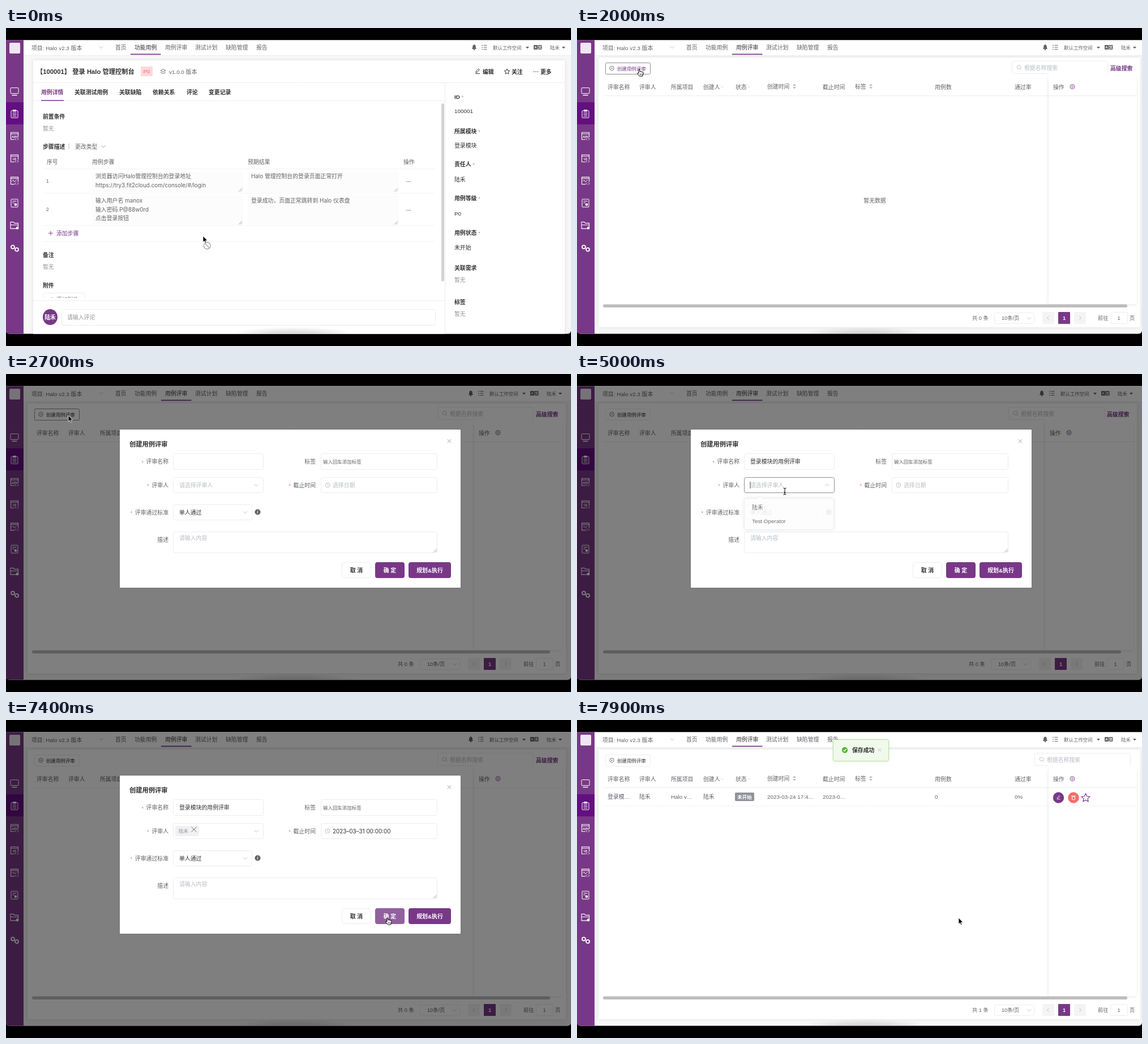
An HTML page with a canvas that plays this animation: 998x561 px, repeating every 8000 ms.

```html
<!DOCTYPE html>
<html lang="zh-CN">
<head>
<meta charset="utf-8">
<title>用例评审</title>
<style>
html, body { margin: 0; width: 100%; height: 100%; overflow: hidden; background: #000; }
canvas { display: block; }
</style>
</head>
<body>
<canvas id="stage" width="998" height="561"></canvas>
<script>
const c = document.getElementById('stage').getContext('2d');
const LOOP = 8000, STEP = 100, SIZE = 9.87, SMALL = 8.46, LARGE = 11.28, BOLD = 600;
const MAIN = '#783887', DARK = '#303133', GRAY = '#606266', MID = '#909399', PALE = '#b8bbc2',
  LINE = '#ebedf1', FOCUS = '#8f8c93', RED = '#f56c6c', WHITE = '#fff';
const SANS = '"Liberation Sans","Noto Sans CJK SC",sans-serif';
const INPUT = 'Inter,"Noto Sans CJK SC",sans-serif';
const USER = '陆禾', REVIEW = '登录模块的用例评审';

// Drawing helpers; text is centred vertically on y
function text(s, x, y, color = GRAY, size = SIZE, weight = 400, align = 'left', family = SANS) {
  c.font = `${weight} ${size}px ${family}`;
  c.textAlign = align;
  c.fillStyle = color;
  c.fillText(s, x, y + size * .37);
}
const texts = (list, ...style) => list.forEach(item => text(...item, ...style));
const value = (s, x, y, color = GRAY) => text(s, x, y, color, SIZE, 400, 'left', INPUT);
const centred = (s, x, y, color, size, weight) => text(s, x, y, color, size, weight, 'center');

function paint(fill, stroke, width = 1) {
  if (fill) { c.fillStyle = fill; c.fill(); }
  if (stroke) { c.strokeStyle = stroke; c.lineWidth = width; c.stroke(); }
}
function box(x, y, w, h, r, fill, stroke) {
  c.beginPath();
  c.roundRect(x, y, w, h, r);
  paint(fill, stroke);
}
function disc(x, y, r, fill, stroke, width) {
  c.beginPath();
  c.arc(x, y, r, 0, 7);
  paint(fill, stroke, width);
}
function trace(pts, close) {
  c.beginPath();
  for (let i = 0; i < pts.length; i += 2) c.lineTo(pts[i], pts[i + 1]);
  if (close) c.closePath();
}
function line(color, width, ...pts) { trace(pts); paint(null, color, width); }
function shape(fill, stroke, width, ...pts) { trace(pts, true); paint(fill, stroke, width); }
function card(x, y, w, h, r, blur, color = 'rgba(0,0,0,.1)') {
  c.save();
  c.shadowColor = color;
  c.shadowBlur = blur;
  box(x, y, w, h, r, WHITE);
  c.restore();
}
function at(x, y, draw) { c.save(); c.translate(x, y); draw(); c.restore(); }
function faded(alpha, draw) {
  if (alpha <= 0) return;
  c.save();
  c.globalAlpha *= alpha;
  draw();
  c.restore();
}
const field = (x, y, w, h, focus) => box(x + .5, y + .5, w - 1, h - 1, 3, WHITE, focus ? FOCUS : LINE);
const chevron = (x, y, dir = 1, color = PALE) => line(color, .9, x - 3.5, y - 1.7 * dir, x, y + 1.8 * dir, x + 3.5, y - 1.7 * dir);
const sideways = (x, y, dir, color) => line(color, 1, x - 1.5 * dir, y - 3, x + 1.5 * dir, y, x - 1.5 * dir, y + 3);
const triangle = (x, y) => shape(GRAY, null, 0, x - 3, y - 1.5, x + 3, y - 1.5, x, y + 2);
function cross(x, y, r, color) { line(color, .9, x - r, y - r, x + r, y + r); line(color, .9, x - r, y + r, x + r, y - r); }
function plus(x, y, color) { line(color, .9, x - 4, y, x + 4, y); line(color, .9, x, y - 4, x, y + 4); }
function grip(x, y) { line(MID, .8, x - 3, y + 3, x + 3, y - 3); line(MID, .8, x, y + 3, x + 3, y); }
function sorter(x, y) {
  shape(PALE, null, 0, x - 3, y - 1, x + 3, y - 1, x, y - 4.5);
  shape(PALE, null, 0, x - 3, y + 1, x + 3, y + 1, x, y + 4.5);
}
function star(x, y, r, width, color) {
  const pts = [];
  for (let i = 0; i < 10; i++) {
    const a = i * Math.PI / 5, q = i % 2 ? r * .48 : r;
    pts.push(x + q * Math.sin(a), y - q * Math.cos(a));
  }
  shape(null, color, width, ...pts);
}
function pencil(x, y, color) {
  shape(null, color, 1, x - 3, y + 2.5, x - 2.6, y, x + 1.5, y - 4, x + 3.3, y - 2.2, x - .8, y + 2);
  line(color, 1, x - 4, y + 4.4, x + 4, y + 4.4);
}

// Timing helpers
const ramp = (t, from, to) => Math.min(1, Math.max(0, (t - from) / (to - from)));
const ease = p => p * p * (3 - 2 * p);
const during = (t, from, to) => t >= from && t < to;
const lastKey = (keys, t) => keys.findLastIndex(k => k[0] <= t);

// Sidebar
const code = () => { line(WHITE, .9, 3, 3, 1, 5, 3, 7); line(WHITE, .9, 5, 3, 7, 5, 5, 7); };
function panel(label) {
  line(WHITE, 1.1, 0, 6, -6.5, 6, -6.5, -6.5, 6.5, -6.5, 6.5, 2);
  line(WHITE, 1, -6.5, -4, 6.5, -4);
  if (label) centred(label, 0, .5, WHITE, 6, 700);
  code();
}
function gear(x, y) { disc(x, y, 3, null, WHITE, 1.8); }
const sideIcons = [
  () => { box(-7, -6.5, 14, 10, 1, null, WHITE); line(WHITE, 1.3, -4.5, 6.5, 4.5, 6.5); },
  () => {
    box(-6, -5.5, 12, 12.5, 1, null, WHITE);
    box(-3, -7.5, 6, 3.5, 1, WHITE);
    [-1.5, 1.2, 4].forEach(y => line(WHITE, 1, -3.5, y, 3.5, y));
  },
  () => panel('API'),
  () => panel('UI'),
  () => { panel(); line(WHITE, 1, -5, 1, -2.5, -1.5, 0, 2, 4, -2); },
  () => {
    box(-6, -7, 12, 14, 1, null, WHITE);
    line(WHITE, 1, -3.5, -3.5, 3.5, -3.5);
    line(WHITE, 1, -3.5, -.5, 0, -.5);
    disc(2, 2.5, 2.3, WHITE);
  },
  () => { shape(null, WHITE, 1.1, -7, 5.5, -7, -6, -2, -6, 0, -4, 6.5, -4, 6.5, 5.5); line(WHITE, 1, -7, -1, 6.5, -1); disc(5, 4.5, 2.4, WHITE); },
  () => { gear(-3, -1.5); gear(4, 3); }
];
function sidebar() {
  box(0, 21, 31, 520, 0, MAIN);
  box(0, 131, 31, 39, 0, '#640f81');
  box(6, 26, 19, 19, 2, '#efe6f2');
  sideIcons.forEach((icon, i) => at(15, 112 + 39.4 * i, icon));
}

function topbar(active, hover, dx) {
  box(31, 21, 967, 27, 0, WHITE);
  line(LINE, 1, 31, 48.5, 998, 48.5);
  text('项目: Halo v2.3 版本', 45, 35);
  chevron(168, 34);
  [['首页', 193], ['功能用例', 227], ['用例评审', 281], ['测试计划', 334], ['缺陷管理', 388], ['报告', 442]]
    .forEach(([s, x], i) => text(s, x, 34.5, i === active || i === hover ? DARK : GRAY));
  box(active === 1 ? 220 : 274, 45.5, 53.5, 1.7, 0, MAIN);
  at(-dx, 0, () => {
    shape(GRAY, null, 0, 823, 37, 824, 35, 824.5, 31, 827, 29, 829.5, 31, 830, 35, 831, 37);
    disc(827, 38, 1.2, GRAY);
    [30.5, 34, 37.5].forEach(y => { line(GRAY, 1, 843.5, y, 849.5, y); line(GRAY, 1, 840, y, 842, y); });
    text('默认工作空间', 860, 34.5, GRAY, SMALL);
    triangle(921, 34.5);
    box(932, 30, 7, 8, 1, GRAY);
    box(939.5, 30, 7, 8, 1, GRAY);
    centred('A', 935.5, 34, WHITE, 6, 700);
    centred('文', 943, 34, WHITE, 6, 700);
    text(USER, 961, 34.5, GRAY, SMALL);
    triangle(985, 34.5);
  });
}

function detailPage(t) {
  card(48, 57, 939, 500, 2, 6);
  text('【100001】 登录 Halo 管理控制台', 54, 77, DARK, LARGE, BOLD);
  box(238, 68, 21, 17, 1, '#fcd9d9');
  centred('P0', 248.5, 76.5, RED, SIZE);
  shape(null, GRAY, .9, 273, 75, 277.5, 72.5, 282, 75, 277.5, 77.5);
  line(GRAY, .9, 273, 78, 277.5, 80.5, 282, 78);
  text('v1.0.0 版本', 288, 77.5);
  pencil(833, 76, DARK);
  star(885, 77, 5, 1, DARK);
  texts([['编辑', 842, 77], ['关注', 893, 77], ['更多', 944, 77]], DARK, SIZE, BOLD);
  [932.5, 936, 939.5].forEach(x => disc(x, 77, .8, DARK));
  line(LINE, 1, 48, 96.5, 987, 96.5);
  line(LINE, 1, 775.5, 96, 775.5, 540);
  line(LINE, 1, 48, 128, 775, 128);

  ['用例详情', '关联测试用例', '关联缺陷', '依赖关系', '评论', '变更记录'].forEach((s, i) =>
    text(s, [62, 121, 200, 259, 319, 358][i], 113, i === 0 || i === 2 && t === 300 ? MAIN : DARK, SIZE, BOLD));
  box(62, 127, 40, 1.6, 0, MAIN);

  texts([['前置条件', 65, 156], ['步骤描述', 65, 209], ['备注', 65, 400], ['附件', 65, 454]], DARK, SIZE, BOLD);
  texts([['暂无', 65, 177], ['暂无', 65, 421]], MID);
  line(PALE, 1, 111, 204, 111, 214);
  text('更改类型', 122, 209);
  chevron(172, 209, 1, MID);
  texts([['序号', 72, 236], ['用例步骤', 152, 236], ['预期结果', 427, 236], ['操作', 702, 236]]);
  [[254, 36, '1', 269.5], [295, 53, '2', 320]].forEach(([y, h, n, mid]) => {
    [152, 427].forEach(x => {
      box(x, y, 267, h, 2, '#fcfcfc');
      grip(x + 262, y + h - 4.5);
    });
    text(n, 71, mid, GRAY, SMALL);
    [708, 711, 714].forEach(x => disc(x, mid + 1.5, .8, GRAY));
  });
  [248.5, 291.5, 348.5, 376.5].forEach(y => line('#f3f4f6', 1, 65, y, 758, y));
  value('浏览器访问Halo管理控制台的登录地址', 158, 261.5);
  value('https:\/\/try3.fit2cloud.com/console/#/login', 158, 277.5);
  value('Halo 管理控制台的登录页面正常打开', 433, 261.5);
  value('输入用户名 manox', 158, 304);
  value('输入密码 P@88w0rd', 158, 320);
  value('点击登录按钮', 158, 335.5);
  value('登录成功，页面正常跳转到 Halo 仪表盘', 433, 304);
  plus(79, 362, MAIN);
  text('添加步骤', 89, 362.5, MAIN);
  field(65, 467, 75, 24);
  plus(81, 479, GRAY);
  text('添加附件', 89, 479);
  box(49, 476, 725, 64, 0, WHITE);
  faded(1 - ramp(t, 100, 400), () => box(769, 133, 5, 314, 2.5, '#d2d2d4'));
  line(LINE, 1, 48, 481, 775, 481);
  c.beginPath();
  c.ellipse(78, 510, 13, 14, 0, 0, 7);
  paint(MAIN);
  centred(USER, 78, 510, WHITE, SIZE, BOLD);
  field(98, 496, 661, 29);
  text('请输入评论', 108, 510.5, MID);

  [['ID', '100001', 121, 146], ['所属模块', '登录模块', 182, 207], ['责任人', USER, 240, 267],
    ['用例等级', 'P0', 300, 327], ['用例状态', '未开始', 361, 387], ['关联需求', '暂无', 423, 444], ['标签', '暂无', 483, 504]
  ].forEach(([label, s, y1, y2], i) => {
    text(label, 792, y1, DARK, SIZE, BOLD);
    if (i < 5) text('*', 792 + c.measureText(label).width + 3, y1 + 1, RED, SMALL);
    text(s, 792, y2, i < 5 ? DARK : MID);
  });
}

function listPage(t, dx) {
  const saved = t >= 7700, ready = during(t, 900, 7700);
  card(38, 52, 957 - dx, 476, 2, 6);
  box(50.5, 61.5, 79, 20, 2, WHITE, during(t, 1900, 2800) ? FOCUS : LINE);
  disc(61.5, 71, 3.7, null, GRAY, .9);
  disc(61.5, 71, 1, GRAY);
  text('创建用例评审', 71, 71.5, during(t, 1900, 2600) ? MAIN : DARK, SMALL);
  texts([['评审名称', 54, 104], ['评审人', 110, 104], ['所属项目', 166, 104], ['创建人', 223, 104], ['状态', 280, 104],
    ['创建时间', 336, 103], ['截止时间', 434, 104], ['标签', 491, 103], ['用例数', 632, 104], ['通过率', 773, 104]], GRAY);
  [256.5, 303.5].forEach(x => at(x, 104, () => { c.scale(.6, .6); chevron(0, 0); }));
  sorter(384, 103);
  sorter(519, 103);
  line(LINE, 1, 46, 119.5, 989 - dx, 119.5);
  if (ready) centred('暂无数据', 526, 304);

  at(-dx, 0, () => {
    const sx = ready ? 768 : 808;
    field(sx, 58, 170, 23);
    disc(sx + 12.5, 69, 3.3, null, PALE, .9);
    line(PALE, .9, sx + 15, 71.5, sx + 17, 73.5);
    text('根据名称搜索', sx + 22, 70, PALE);
    if (ready) text('高级搜索', 942, 71, MAIN, SIZE, BOLD);
    card(833, 87, 156, 400, 0, 6, 'rgba(0,0,0,.12)');
    box(833, 80, 160, 7, 0, WHITE);
    box(990, 82, 4, 420, 0, WHITE);
    line(LINE, 1, 834, 119.5, 989, 119.5);
    text('操作', 841, 104);
    disc(875, 103.5, 4, null, MAIN, .9);
    disc(875, 103.5, 1.5, null, MAIN, .8);

    text(`共 ${saved ? 1 : 0} 条`, 698, 512, GRAY, 9.2);
    field(737, 502, 71, 20);
    text('10条/页', 750, 512, GRAY, 9.2);
    chevron(798.5, 512);
    box(822, 501, 21, 21, 1, '#f4f4f5');
    box(850, 501, 21, 21, 1, MAIN);
    box(878, 501, 21, 21, 1, '#f4f4f5');
    sideways(832, 511.5, -1, PALE);
    centred('1', 860.5, 512, WHITE, 9.2, BOLD);
    sideways(889, 511.5, 1, PALE);
    text('前往', 920, 512, GRAY, 9.2);
    field(942, 501, 31, 21);
    centred('1', 957, 512, GRAY, 9.2);
    text('页', 976, 512, GRAY, 9.2);
  });
  box(46, 487.5, dx ? 915 : 926, 5.5, 2.7, '#bdbdbd');

  if (saved) {
    texts([['登录模…', 54, 135.5], [USER, 110, 135.5], ['Halo v…', 166, 135.5], [USER, 223, 135.5], ['2023-03-24 17:4…', 336, 135.5],
      ['2023-0…', 434, 135.5], ['0', 632, 135.5], ['0%', 773, 135.5]], GRAY);
    box(279, 128, 34, 15, 2, MID);
    centred('未开始', 296, 135.5, WHITE, SMALL, BOLD);
    line('#f3f4f6', 1, 46, 151.5, 989, 151.5);
    disc(850.5, 137, 9.7, MAIN);
    at(850.5, 136.5, () => { c.scale(.75, .75); pencil(0, 0, WHITE); });
    disc(877, 137, 9.7, RED);
    box(874.5, 135.5, 5, 5, .5, null, WHITE);
    line(WHITE, 1, 873, 134, 881, 134);
    star(898.5, 137.5, 7.8, 1.2, MAIN);
  }
}

function button(s, x, w, fill) {
  box(x + .5, 332.5, w - 1, 27, 3, fill, fill === WHITE ? LINE : fill);
  centred(s, x + w / 2, 346, fill === WHITE ? DARK : WHITE, SIZE, BOLD);
}
const caret = (x, y) => line(DARK, .9, x, y - 6, x, y + 6);

function dialog(t) {
  const picked = t >= 5500, dated = t >= 6700;
  const nameFocus = during(t, 3100, 4700), userFocus = during(t, 4700, 5700), dateFocus = during(t, 6000, 7100);
  card(201, 98, 602, 279, 1, 3, 'rgba(0,0,0,.15)');
  text('创建用例评审', 218, 123.5, DARK, LARGE, BOLD);
  cross(783, 118.5, 3.2, MID);
  [['评审名称', 287, 154.5, 1], ['评审人', 287, 196, 1], ['评审通过标准', 287, 244, 1], ['描述', 287, 292],
    ['标签', 547, 154.5], ['截止时间', 547, 196, 1]].forEach(([s, x, y, must]) => {
    text(s, x, y, GRAY, SIZE, 400, 'right');
    if (must) text('*', x - s.length * SIZE - 6.5, y + 1, RED, SMALL, 400, 'center');
  });

  field(295, 140, 160, 29, nameFocus);
  if (t >= 3500) value(REVIEW, 306, 154.5, DARK);
  if (nameFocus && !during(t, 3800, 4000) && t < 4300) caret(t < 3500 ? 306 : 395, 154.5);
  field(556, 140, 206, 29);
  text('输入回车添加标签', 560, 155, GRAY, SMALL);

  field(295, 182, 160, 28, userFocus);
  if (picked) {
    box(299, 187, 42, 18, 2, '#f1f1f3');
    text(USER, 305, 196, MID, SMALL);
    cross(332, 193, 4.5, GRAY);
  } else {
    value('请选择评审人', 306, 196, PALE);
    if (userFocus && t !== 5200) caret(306, 196);
  }
  chevron(442, 196, userFocus ? -1 : 1);

  field(556, 182, 206, 28, dateFocus);
  disc(568, 196, 4, null, PALE, .9);
  line(PALE, .9, 568, 193.5, 568, 196.3, 570, 196.3);
  if (dated) value('2023–03–31 00:00:00', 577, 196, DARK);
  else value('选择日期', 577, 196, PALE);

  field(295, 230, 140, 28);
  value('单人通过', 306, 244.5, DARK);
  chevron(422.5, 244);
  disc(444.5, 243.5, 5, GRAY);
  c.font = `italic 700 8px "Liberation Serif",serif`;
  c.fillStyle = WHITE;
  c.textAlign = 'center';
  c.fillText('i', 444.3, 246.3);

  field(295, 278, 467, 38);
  value('请输入内容', 306, 289.5, PALE);
  grip(758, 311.5);

  button('取 消', 593, 52, WHITE);
  button('确 定', 652, 52, t >= 7300 ? '#93609f' : MAIN);
  button('规划&执行', 711, 75, MAIN);

  faded(Math.min(ramp(t, 4640, 5040), 1 - ramp(t, 5600, 5900)), () => userMenu(t, picked));
  faded(Math.min(ramp(t, 6000, 6200), 1 - ramp(t, 7000, 7300)), () => calendar(t, dated));
}

function popup(x, y, w, h, tip) {
  card(x, y, w, h, 3, 6);
  box(x + .5, y + .5, w - 1, h - 1, 3, null, LINE);
  shape(WHITE, null, 0, tip - 5, y + 1.5, tip, y - 4, tip + 5, y + 1.5);
  line(LINE, 1, tip - 5, y + .5, tip, y - 4, tip + 5, y + .5);
}
function userMenu(t, picked) {
  popup(295, 219, 159, 56, 324);
  if (t >= 5200) box(296, 223, 157, 24, 0, '#f6f5f8');
  text(USER, 309, 235.5, picked ? MAIN : GRAY);
  text('Test Operator', 309, 259);
}
function calendar(t, dated) {
  popup(556, 219, 228, 299, 585);
  field(563, 224, 104, 24);
  field(672, 224, 105, 24);
  value(dated ? '2023–03–31' : '选择日期', 574, 236, dated ? GRAY : PALE);
  value(dated ? '00:00:00' : '选择时间', 684, 236, dated ? GRAY : PALE);
  line(LINE, 1, 556, 250.5, 784, 250.5);
  [[571.5, -1], [575, -1], [590, -1], [750, 1], [765, 1], [768.5, 1]].forEach(([x, dir]) => sideways(x, 269.5, dir, DARK));
  centred('2023 年', 656, 269.5, GRAY, LARGE, BOLD);
  centred('3 月', 693, 269.5, GRAY, LARGE, BOLD);
  line('#f3f4f6', 1, 567, 318.5, 773, 318.5);
  [...'日一二三四五六'].forEach((s, i) => centred(s, 581.5 + 29.42 * i, 305.5, GRAY, SMALL));
  for (let i = 0; i < 42; i++) {
    const day = i - 2, x = 581.5 + 29.42 * (i % 7), y = 333 + 26.8 * Math.floor(i / 7);
    const inside = day > 0 && day < 32, chosen = dated && day === 31;
    const label = day < 1 ? day + 28 : inside ? day : day - 31;
    if (chosen) disc(x, y, 8.5, MAIN);
    const lit = day === 24 || day === 23 && t === 6400;
    centred(label, x, y, chosen ? WHITE : lit ? MAIN : inside ? GRAY : PALE, SMALL, day === 24 ? 700 : 400);
  }
  line(LINE, 1, 556, 491.5, 784, 491.5);
  centred('此刻', 726, 504.5, MAIN, SMALL);
  box(742.5, 495.5, 37, 18, 2, WHITE, LINE);
  centred('确定', 761, 504.5, DARK, SMALL);
}

function toast(t) {
  faded(ramp(t, 7650, 7900), () => at(0, -12 * (1 - ramp(t, 7650, 7900)), () => {
    card(452, 34, 99, 39, 3, 4);
    box(452.5, 34.5, 98, 38, 3, '#f0f9eb', '#b5e3a0');
    disc(473, 53, 5.2, '#52b82f');
    line(WHITE, 1.2, 470.5, 53, 472.4, 55, 475.8, 51);
    text('保存成功', 486, 53.5, DARK, SIZE, BOLD);
    cross(534.5, 53, 2.8, PALE);
  }));
}

// Pointer: [time, x, y] stops and [time, look] switches
const stops = [[0, 348, 367], [50, 348, 367], [300, 236, 115], [500, 301, 35], [1650, 301, 35], [2000, 110, 73],
  [2700, 110, 73], [3000, 398, 153], [3150, 398, 153], [3400, 509, 133], [4250, 509, 133], [4700, 367, 207], [5100, 367, 207],
  [5300, 322, 237], [5500, 322, 237], [5900, 610, 198], [6100, 610, 198], [6400, 710, 427], [6600, 728, 439],
  [6700, 728, 439], [6900, 761, 502], [7050, 761, 502], [7400, 674, 349], [8000, 674, 349]];
const looks = [[0, 'blocked'], [100, 'arrow'], [500, 'hand'], [1700, 'arrow'], [1900, 'hand'], [2600, 'arrow'], [3000, 'beam'],
  [3300, 'arrow'], [4500, 'beam'], [5200, 'hand'], [5600, 'arrow'], [5900, 'beam'], [6200, 'arrow'], [6300, 'hand'],
  [7100, 'arrow'], [7300, 'hand'], [7700, 'arrow']];
const pointers = {
  arrow() { shape('#000', WHITE, .8, 0, 0, 0, 11, 2.5, 8.7, 4.2, 12.4, 6, 11.6, 4.4, 8, 7.8, 8); },
  blocked() {
    pointers.arrow();
    disc(7.3, 17, 6, WHITE, '#a6a6a8', 1.3);
    line('#a6a6a8', 1.3, 3.2, 12.8, 11.4, 21.2);
  },
  hand() {
    shape(WHITE, '#000', 1, -1, 0, .8, 0, 1.2, 4, 3, 3.8, 5, 4.4, 7, 5.2, 7, 8, 5.6, 12, .5, 12, -3.3, 7.6, -2.8, 6.2, -1, 7);
    [1.4, 3.2, 5].forEach(x => line('#000', .7, x, 7.5, x, 10));
  },
  beam() {
    line('#000', 1, -2.5, -6, 0, -5, 2.5, -6);
    line('#000', 1, 0, -5, 0, 5);
    line('#000', 1, -2.5, 6, 0, 5, 2.5, 6);
    line('#000', 1, -1.5, 2, 1.5, 2);
  }
};
function pointer(t) {
  const i = lastKey(stops, t), [t0, x0, y0] = stops[i], [t1, x1, y1] = stops[i + 1];
  const p = ease(ramp(t, t0, t1));
  at(x0 + (x1 - x0) * p, y0 + (y1 - y0) * p, pointers[looks[lastKey(looks, t)][1]]);
}

function dock() {
  at(508, 541, () => {
    c.scale(1, .12);
    const g = c.createRadialGradient(0, 0, 40, 0, 0, 112);
    g.addColorStop(0, 'rgba(130,130,130,.26)');
    g.addColorStop(1, 'rgba(130,130,130,0)');
    c.fillStyle = g;
    c.fillRect(-112, -112, 224, 224);
  });
}

function draw() {
  const t = Math.floor(performance.now() % LOOP / STEP) * STEP;
  const open = Math.min(ramp(t, 2560, 2700), 1 - ramp(t, 7620, 7820));
  const dx = during(t, 2600, 7800) ? 6 : 0, detail = t < 700;
  c.fillStyle = '#000';
  c.fillRect(0, 0, 998, 561);
  c.save();
  c.beginPath();
  c.roundRect(0, 21.5, 998, 518, [0, 0, 6, 6]);
  c.clip();
  box(0, 21, 998, 520, 0, '#f7f7f8');
  if (detail) detailPage(t); else listPage(t, dx);
  topbar(detail ? 1 : 2, t >= 500 ? 2 : -1, dx);
  sidebar();
  dock();
  faded(open, () => {
    box(0, 21, 998, 520, 0, 'rgba(0,0,0,.5)');
    at(0, -14 * (1 - open), () => dialog(t));
  });
  toast(t);
  pointer(t);
  c.restore();
  requestAnimationFrame(draw);
}
draw();
</script>
</body>
</html>
```
